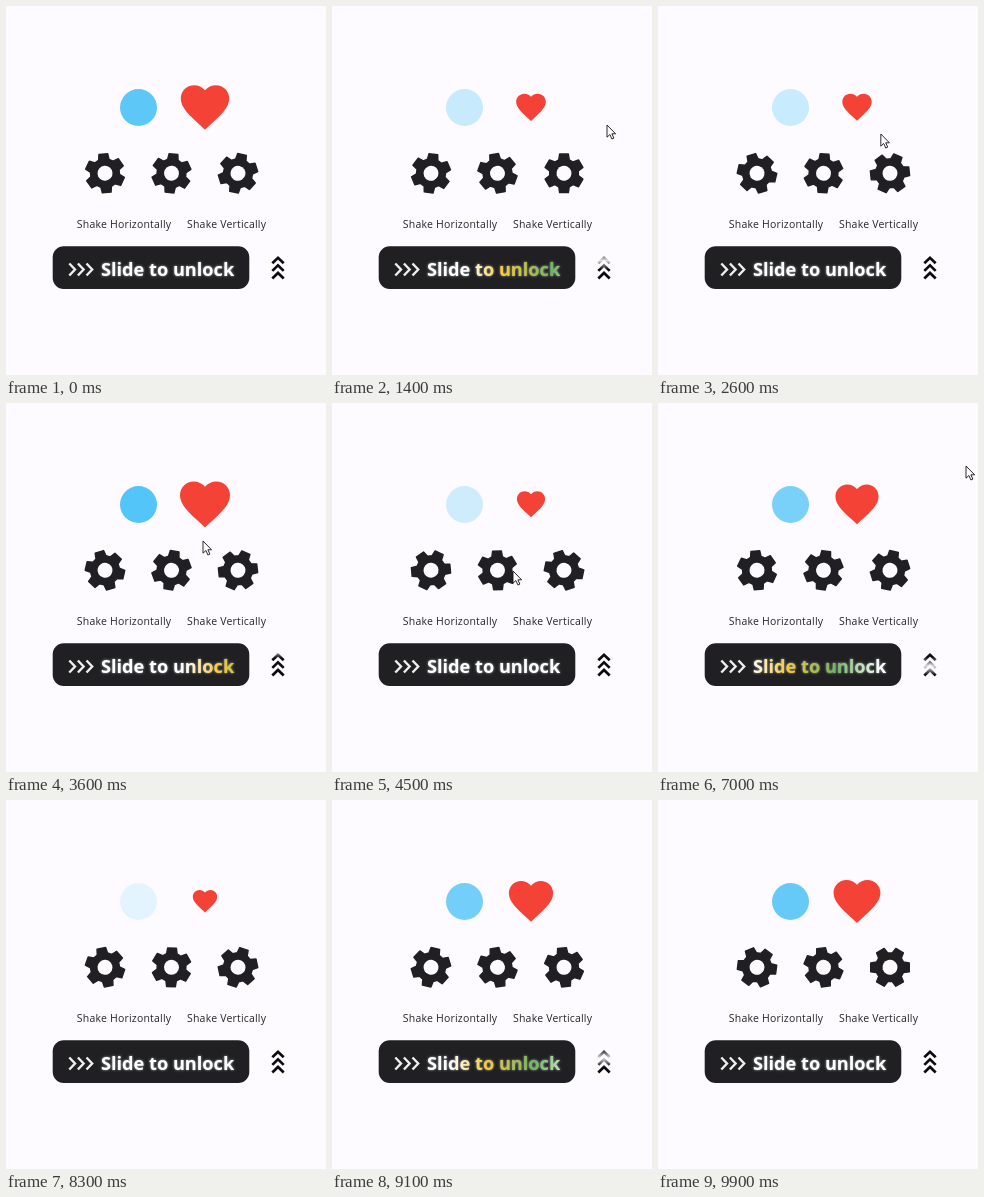
Write an HTML page with a canvas that moves like this. It is 320 px wide and 369 px high and loops after 10 s.

```html
<!DOCTYPE html>
<html lang="en">
<head>
<meta charset="utf-8">
<title>Looping icon effects</title>
<style>
html, body { margin: 0; width: 100%; height: 100%; overflow: hidden; background: #fdfbff; }
canvas { display: block; width: 320px; height: 369px; }
</style>
</head>
<body>
<canvas id="stage" width="320" height="369"></canvas>
<script>
const ctx = document.getElementById('stage').getContext('2d');
const LOOP = 10000, STEP = 100;
const BG = '#fdfbff', DARK = '#202023';

const heart = new Path2D('M12 21.35l-1.45-1.32C5.4 15.36 2 12.28 2 8.5 2 5.42 4.42 3 7.5 3c1.74 0 3.41.81 4.5 2.09C13.09 3.81 14.76 3 16.5 3 19.58 3 22 5.42 22 8.5c0 3.78-3.4 6.86-8.55 11.54L12 21.35z');
const arrow = new Path2D('M0 0V12.2L2.9 9.5L4.9 14L6.9 13.1L4.9 8.8H8.6Z');

// [seconds, phase]: odd phases are full, even phases are faint and small
const PULSE = [[0, 0.86], [1.4, 1.62], [3.6, 3], [5.5, 4.385], [7, 5.31], [8.3, 6.24], [9.9, 7.2]];
// [seconds, x, y] of the pointer tip
const POINTER = [[1, 326, 112], [1.2, 311, 115], [1.4, 275, 119], [2.4, 228, 126], [3.6, 197, 138],
  [4.5, 181, 168], [5.5, 167, 200], [6.2, 238, 138], [6.6, 300, 84], [7, 308, 63], [7.6, 311, 23], [8, 326, 21]];

// Linear interpolation through rows of [time, ...values]
function along(rows, t) {
  let i = 1;
  while (i < rows.length - 1 && t > rows[i][0]) i++;
  const a = rows[i - 1], b = rows[i];
  const k = (t - a[0]) / (b[0] - a[0]);
  return a.slice(1).map((v, j) => v + (b[j + 1] - v) * k);
}

const ease = k => k * k * (3 - 2 * k);
const turn = degrees => degrees * Math.PI / 180;

function pulse(t) {
  const phase = along(PULSE, t)[0];
  return ease(1 - Math.abs(1 - phase % 2));
}

// Seconds relative to the sweep reaching the end of the label
function sweep(t) {
  const period = 1.95;
  return ((t - 3.6 + 1 + 3 * period) % period) - 1;
}

// Brief jerk, -1 at its peak
function jerk(t) {
  const period = 1.22, half = 0.075;
  const u = ((t - 1.08 + period * 1.5) % period) - period / 2;
  return Math.abs(u) < half ? -Math.cos(Math.PI / 2 * u / half) : 0;
}

function drawGear(x, y, angle) {
  ctx.save();
  ctx.translate(x, y);
  ctx.rotate(angle);
  ctx.scale(50 / 24, 50 / 24);
  ctx.beginPath();
  for (let i = 0; i < 6; i++) {
    const c = Math.cos(i * Math.PI / 3), s = Math.sin(i * Math.PI / 3);
    for (const [px, py] of [[-2.5, -6.5], [-2.1, -9.25], [2.1, -9.25], [2.5, -6.5]]) {
      ctx.lineTo(px * c - py * s, px * s + py * c);
    }
  }
  ctx.closePath();
  ctx.fillStyle = ctx.strokeStyle = DARK;
  ctx.lineWidth = 0.7;
  ctx.lineJoin = 'round';
  ctx.fill();
  ctx.stroke();
  ctx.beginPath();
  ctx.arc(0, 0, 3.6, 0, Math.PI * 2);
  ctx.fillStyle = BG;
  ctx.fill();
  ctx.restore();
}

function gradient(x0, y0, x1, y1, stops) {
  const g = ctx.createLinearGradient(x0, y0, x1, y1);
  for (const [at, color] of stops) g.addColorStop(at, color);
  return g;
}

function polyline(points) {
  ctx.beginPath();
  for (const [x, y] of points) ctx.lineTo(x, y);
  ctx.stroke();
}

function drawLabels(t) {
  const d = jerk(t);
  ctx.font = '10.5px "Open Sans", "Noto Sans", sans-serif';
  ctx.letterSpacing = '0.2px';
  ctx.fillStyle = '#252528';
  ctx.fillText('Shake Horizontally', 70.8 + 7 * d, 222);
  ctx.fillText('Shake Vertically', 181, 222 + 5 * d);
  ctx.letterSpacing = '0px';
}

function drawSlider(t) {
  ctx.fillStyle = DARK;
  ctx.beginPath();
  ctx.roundRect(46.7, 240.3, 196.6, 42.7, 11);
  ctx.fill();

  ctx.strokeStyle = '#eee';
  ctx.lineWidth = 2.4;
  ctx.lineJoin = 'miter';
  for (let i = 0; i < 3; i++) {
    const x = 63.3 + i * 8.6;
    polyline([[x, 257.5], [x + 5.7, 263.5], [x, 269.5]]);
  }

  const mid = 213 + 170 * sweep(t);
  ctx.save();
  ctx.font = 'bold 18.2px "Open Sans", "Noto Sans", sans-serif';
  ctx.shadowColor = 'rgba(235,245,245,0.7)';
  ctx.shadowBlur = 2.5;
  ctx.fillStyle = gradient(mid - 35, 0, mid + 95, 0,
    [[0, '#fff'], [0.27, '#fcc934'], [0.65, '#6cb85c'], [1, '#fff']]);
  ctx.fillText('Slide to unlock', 94.9, 270);
  ctx.restore();
}

function drawCarets(t) {
  const mid = 246 - 34 * sweep(t);
  ctx.strokeStyle = gradient(0, mid - 9, 0, mid + 9,
    [[0, '#0c0c0d'], [0.5, '#dedde0'], [1, '#0c0c0d']]);
  ctx.lineWidth = 2.7;
  ctx.lineJoin = 'miter';
  for (let i = 0; i < 3; i++) {
    const y = 251.8 + i * 7.6;
    polyline([[266.3, y + 5.5], [272, y], [277.7, y + 5.5]]);
  }
}

function drawPointer(t) {
  if (t <= 1 || t >= 8) return;
  const [x, y] = along(POINTER, t);
  ctx.save();
  ctx.translate(x, y);
  ctx.fillStyle = '#fff';
  ctx.strokeStyle = '#111';
  ctx.lineWidth = 0.9;
  ctx.fill(arrow);
  ctx.stroke(arrow);
  ctx.restore();
}

function draw(t) {
  const p = pulse(t);
  ctx.fillStyle = BG;
  ctx.fillRect(0, 0, 320, 369);

  ctx.globalAlpha = p;
  ctx.fillStyle = '#54c5f8';
  ctx.beginPath();
  ctx.arc(132.5, 101.5, 18.5, 0, Math.PI * 2);
  ctx.fill();
  ctx.globalAlpha = 1;

  const size = 2.5 * (0.4 + 0.6 * p);
  ctx.save();
  ctx.translate(199, 101);
  ctx.scale(size, size);
  ctx.translate(-12, -12);
  ctx.fillStyle = '#f44336';
  ctx.fill(heart);
  ctx.restore();

  // Clockwise, rocking, counter-clockwise
  drawGear(99, 167.3, turn(180 * t - 5));
  drawGear(165.5, 167.3, turn(10 * Math.sin(Math.PI * (t / 2 + 0.8))));
  drawGear(232, 167.3, turn(12 - 180 * t));

  drawLabels(t);
  drawSlider(t);
  drawCarets(t);
  drawPointer(t);
}

const start = performance.now();
function tick() {
  const ms = (performance.now() - start) % LOOP;
  draw(Math.floor(ms / STEP) * STEP / 1000);
  requestAnimationFrame(tick);
}
tick();
</script>
</body>
</html>
```
